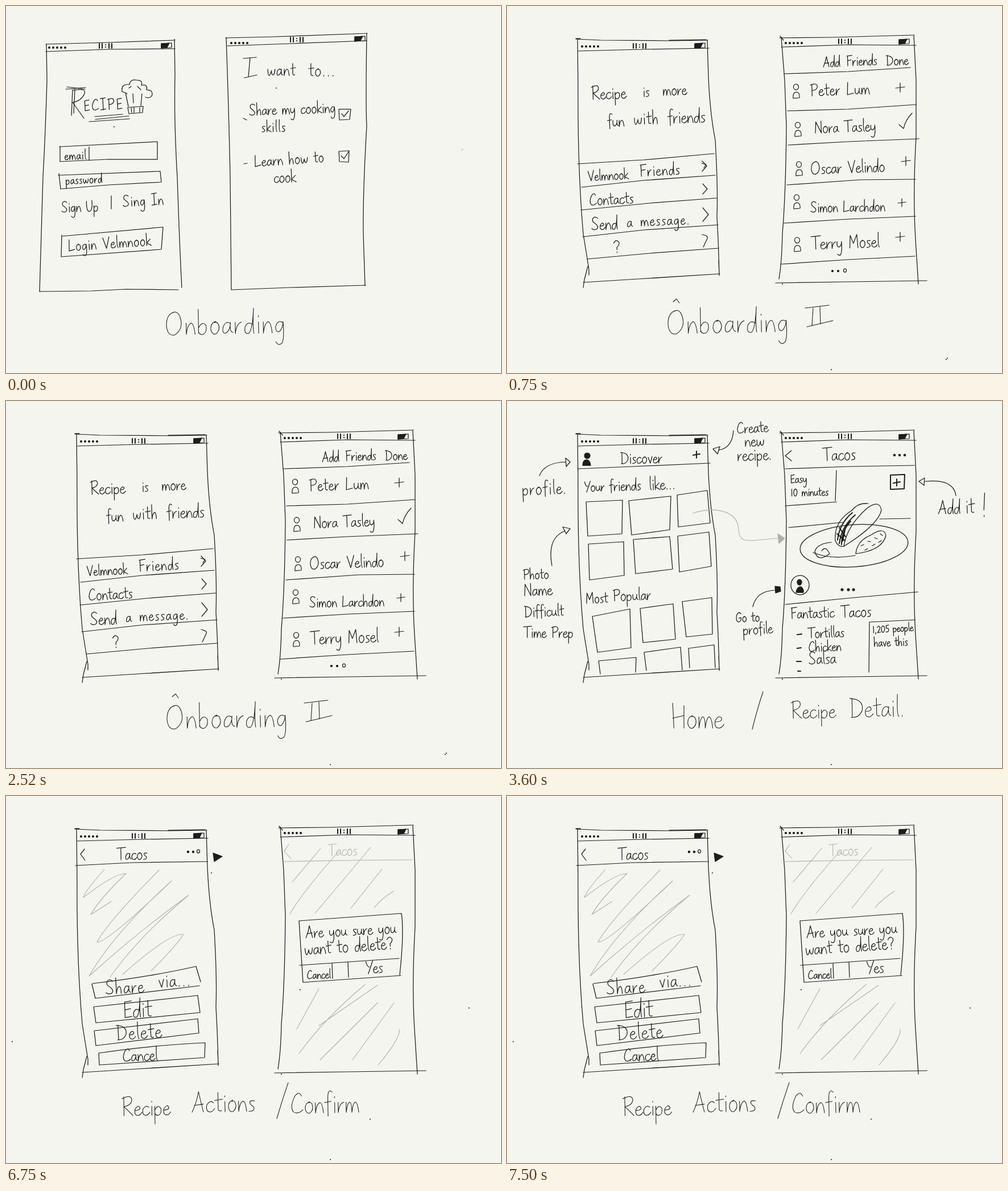
Animation, 870 px wide and 644 px high, one loop 8000 ms. Source, as an HTML page:

```html
<!DOCTYPE html>
<html lang="en">
<head>
<meta charset="utf-8">
<title>App wireframes</title>
<style>
  html, body { margin: 0; width: 100%; height: 100%; overflow: hidden; background: #f5f5f0; }
  svg { display: block; width: 870px; height: 644px; }
  path, ellipse { fill: none; stroke: #1d1d1c; stroke-width: 1.25; stroke-linecap: round; stroke-linejoin: round; vector-effect: non-scaling-stroke; }
  .solid { fill: #1d1d1c; }
  .bold { stroke-width: 2; }
  .thin, .title path { stroke-width: 1.05; }
  .pale, .pale path { stroke: #b0b0ac; stroke-width: 1.1; }
  .pale.solid { fill: #b0b0ac; }
</style>
</head>
<body>
<svg id="stage" viewBox="0 0 870 644"></svg>
<script>
// Single-stroke handwriting: advance width and pen path, baseline at 0, x-height 10.
const GLYPHS = {
  a: [9, 'M7-8Q3-11 1-5Q0 1 4-1Q7-4 7-9Q6-1 9-1'],
  b: [9, 'M1-20L1-1M1-5Q4-11 7-7Q8-2 5 0Q2 1 1-2'],
  c: [8, 'M7-8Q4-11 1-6Q0 0 4 0Q6 0 8-3'],
  d: [9, 'M7-7Q3-10 1-5Q0 1 4 0Q7-3 8-20Q7-5 8 0'],
  e: [8, 'M1-5Q7-5 6-8Q4-11 1-6Q0 0 4 0Q6 0 8-3'],
  f: [7, 'M7-18Q3-22 3-12L3 3M0-9L6-10'],
  g: [9, 'M7-8Q3-11 1-5Q1 0 4-1Q7-4 7-9Q8 4 6 8Q3 11 1 7'],
  h: [9, 'M1-20L1 0Q2-8 5-9Q7-9 7 0'],
  i: [4, 'M2-9L2 0M2-14L2-13'],
  k: [8, 'M1-20L1 0M7-10L1-4L8 0'],
  l: [4, 'M2-20Q1-1 3 0'],
  m: [13, 'M1-9L1 0Q2-8 4-9Q6-9 6 0Q7-8 9-9Q11-9 12 0'],
  n: [9, 'M1-9L1 0Q2-8 5-9Q7-9 8 0'],
  o: [9, 'M5-10Q1-9 1-4Q2 1 5 0Q9-3 7-8Q6-10 4-9'],
  p: [9, 'M1-9L1 9M1-5Q4-11 7-7Q8-2 5 0Q2 1 1-2'],
  r: [7, 'M1-9L1 0Q2-8 6-9'],
  s: [7, 'M6-9Q1-10 2-7Q3-5 5-4Q7 0 1 0'],
  t: [7, 'M3-17L3-2Q4 0 6-1M0-10L7-11'],
  u: [9, 'M1-9Q0 0 4-1Q7-3 7-9Q6-1 9-1'],
  v: [8, 'M1-9L4 0L7-10'],
  w: [12, 'M1-9Q1 0 3 0Q5-2 6-7Q6 0 9-1Q11-4 11-9'],
  y: [9, 'M1-9Q0-1 4-2Q7-4 7-9Q8 4 5 9Q3 10 1 8'],
  A: [13, 'M1 0Q5-8 7-18Q9-8 11 0M3-6L11-7'],
  C: [12, 'M10-15Q8-20 4-15Q-1-5 3-1Q7 1 11-3'],
  D: [13, 'M2-17L2 0M0-17Q13-16 11-6Q8 1 1 0'],
  E: [10, 'M9-17L2-16L2 0L9-1M2-8L8-9'],
  F: [10, 'M2-17L2 0M1-17L10-18M2-9L8-10'],
  G: [12, 'M10-15Q6-21 2-12Q0 0 6 0Q11-2 10-8L6-7'],
  H: [12, 'M1-20L2 0M10-18L10 0M1-8L10-10'],
  I: [9, 'M0-18L8-19M4-18L4 0M0 0L8-1'],
  L: [11, 'M2-18L1 0L10-2'],
  M: [14, 'M1 0L2-17L6-6L11-18L12 0'],
  N: [12, 'M1 0L2-17L10 0L10-18'],
  O: [15, 'M8-18Q1-17 1-7Q2 2 8 0Q15-5 12-14Q10-20 5-17'],
  P: [11, 'M2-17L2 0M0-16Q10-20 10-13Q9-8 2-8'],
  R: [12, 'M2-19L2 0M0-17Q10-22 10-15Q9-10 2-9L11 0'],
  S: [11, 'M9-16Q5-20 2-16Q0-12 5-9Q11-4 7-1Q3 1 0-2'],
  T: [12, 'M0-17L13-18M6-17L6 0'],
  U: [12, 'M1-17Q0 1 6 0Q11-2 10-18'],
  V: [12, 'M1-17L6 0L11-18'],
  Y: [11, 'M1-17Q3-8 6-9M11-18L4 1'],
  0: [10, 'M5-15Q1-14 1-7Q2 1 5 0Q9-4 8-11Q7-16 4-14'],
  1: [5, 'M2-15L2 0'],
  2: [9, 'M1-12Q4-18 7-12Q7-8 1 0L8-1'],
  5: [9, 'M8-16L2-15L2-9Q9-10 7-3Q5 1 1-1'],
  '.': [5, 'M2-1L2 0'],
  ',': [5, 'M2-1L1 3'],
  '?': [10, 'M1-13Q4-19 8-14Q9-11 5-7L5-4M5-1L5 0'],
  '!': [6, 'M3-18L2-5M2-1L2 0'],
  ' ': [8, '']
};

const pen = (d, cls = '') => `<path class="${cls}" d="${d}"/>`;
const oval = (x, y, rx, ry = rx, cls = '', rot = 0) =>
  `<ellipse class="${cls}" cx="${x}" cy="${y}" rx="${rx}" ry="${ry}" transform="rotate(${rot} ${x} ${y})"/>`;
const dots = (y, r, ...xs) => xs.map(x => oval(x, y, r, r, 'solid')).join('');
const speck = (x, y) => oval(x, y, .4, .4, 'solid');
const plus = (x, y, r, cls) => pen(`M${x - r} ${y + 1}L${x + r} ${y - 1}M${x} ${y - r}L${x} ${y + r}`, cls);
const chevron = (x, y, w, h, cls) => pen(`M${x} ${y - h}L${x + w} ${y}L${x} ${y + h}`, cls);

function write(text, x, y, size, tilt = -2, spacing = 0, cls = '') {
  let at = 0;
  const letters = [...text].map(ch => {
    const [advance, d] = GLYPHS[ch];
    const glyph = `<path transform="translate(${at})" d="${d}"/>`;
    at += advance + spacing;
    return glyph;
  }).join('');
  return `<g role="img" aria-label="${text}" class="${cls}" transform="translate(${x} ${y}) rotate(${tilt}) scale(${size})">${letters}</g>`;
}
const title = (text, x, y, size, tilt = -1, spacing = 0) => write(text, x, y, size, tilt, spacing, 'title');
const lines = rows => rows.map(row => write(...row)).join('');

function statusBar(x, y, clockX, clockY, batteryX, batteryY) {
  const clock = [0, 5, 17, 22].map(dx => `M${clockX + dx} ${clockY}l0 8`).join('');
  return dots(y, 1.4, x, x + 7, x + 14, x + 21, x + 28) +
    pen(clock, 'bold') + dots(clockY + 2, .5, clockX + 11) + dots(clockY + 6, .5, clockX + 11) +
    pen(`M${batteryX} ${batteryY + 1}l18-1l0 8l-18 1Z`) +
    pen(`M${batteryX} ${batteryY + 1}l14-1l-4 8l-10 1Z`, 'solid');
}

const leftPhone =
  pen('M121 58L165 60L290 61L353 60M121 57L129 57M285 60L350 59M125 79L240 76L355 74') +
  pen('M124 58Q125 130 125 200Q126 310 134 400L144 462L144 472M142 457L136 480L134 494') +
  pen('M352 60L354 125Q357 190 366 235Q371 320 369 370Q372 420 373 473M372 447L373 468') +
  pen('M134 485L230 479L374 470') +
  statusBar(132, 71, 222, 66, 330, 65);
const rightPhone =
  pen('M479 56L570 55L716 51M480 53L486 60M482 72L600 68L719 69') +
  pen('M482 55L488 130L491 210Q490 330 484 400Q483 450 478 479') +
  pen('M715 52L719 130L719 230Q713 330 718 410L723 488') +
  pen('M472 486L600 484L738 482') + speck(484, 488) +
  statusBar(490, 65, 583, 58, 689, 58);

const person = (x, y) => oval(x, y, 4.5, 5) +
  pen(`M${x - 5} ${y + 20}Q${x - 6} ${y + 9} ${x + 1} ${y + 9}Q${x + 7} ${y + 10} ${x + 6} ${y + 19}Z`);

const onboarding = () =>
  pen('M70 67L180 64L297 60M70 80L180 76L297 75') +
  pen('M71 67L72 130Q69 230 65 300L59 501') +
  pen('M296 58L297 120Q295 200 301 300Q305 420 309 494M59 501L150 500L210 497L303 498') +
  statusBar(76, 73, 164, 66, 273, 65) +
  pen('M105 146L140 143M107 142L139 146M117 147L115 192M121 146L119 188') +
  pen('M118 148Q142 143 138 154Q132 167 117 169L137 197') +
  pen('M156 194L205 190M146 203L217 198M157 199L216 193') +
  pen('M204 150Q202 136 217 138Q218 128 230 130Q241 130 238 139Q250 137 247 147Q258 147 257 156Q254 163 245 160') +
  pen('M210 152L215 176M223 154L224 170M239 154L237 175M204 150L213 154M216 144L220 141M231 141L237 147') +
  pen('M214 178L241 176L240 187L216 189ZM220 179L221 187M225 178L225 187M235 178L235 186') +
  pen('M95 246L95 273L180 269L266 269L266 238L94 247M146 247L146 271') +
  pen('M93 294L96 321L180 314L273 309L271 290L92 297') +
  pen('M98 402L97 440L273 427L276 388L98 404M185 333L185 356') +
  lines([
    ['ECIPE', 137, 184, 1.1, -3, 2.5], ['email', 103, 270, .9, -2, 1.2], ['password', 105, 313, .85, -3, 1],
    ['Sign Up', 98, 362, 1.05], ['Sing In', 206, 352, 1.1, -3, 1], ['Login Velmnook', 110, 430, 1.1, -4, .8],
    ['want', 459, 122, 1.25, 0, 1], ['to...', 532, 123, 1.3, 0, 1.2],
    ['Share my cooking', 428, 192, 1.1], ['skills', 449, 221, 1.05, -1, 1.3],
    ['Learn how to', 437, 282, 1.1, -4, .5], ['cook', 471, 310, 1.15]
  ]) +
  pen('M386 56L470 54L635 48M389 70L500 66L634 61') +
  pen('M387 55Q392 200 394 300L396 498L500 494L632 490') +
  pen('M634 48Q632 180 634 210Q627 330 628 400L631 491') +
  statusBar(396, 65, 500, 55, 613, 53) +
  pen('M417 92L440 90M429 91L426 124M419 126L441 121') +
  pen('M585 181L606 181L604 199L586 200ZM590 189L594 194L602 184') +
  pen('M585 255L603 254L602 274L586 273ZM589 263L594 268L602 256') +
  pen('M417 197L423 200M418 277L424 276') + speck(190, 212) + speck(475, 144) +
  pen('M801 253L803 251', 'pale') +
  title('Onboarding', 280, 577, 2.2, -1, .8);

const inviteFriends = () => leftPhone + rightPhone +
  pen('M124 277L240 270L364 259M131 318L240 306L366 297M130 358L250 346L369 337M133 405L240 393L371 384M141 444L250 434L372 425') +
  chevron(343, 281, 8, 9) + pen('M342 276L350 278L346 284') +
  chevron(344, 321, 8, 9) + chevron(344, 366, 10, 12) + pen('M343 401Q354 403 352 408L345 423') +
  pen('M487 119L600 115L709 108M493 184L600 181L719 173M494 244L600 238L724 233') +
  pen('M492 314L620 305L718 304M487 381L600 374L718 369M482 453L600 445L717 439') +
  person(508, 142) + person(511, 209) + person(513, 278) + person(509, 336) + person(510, 411) +
  plus(691, 143, 8) + plus(701, 272, 8) + plus(694, 345, 7) + plus(691, 405, 8) +
  pen('M689 208L697 215Q700 200 712 188') +
  lines([
    ['Recipe', 149, 164, 1.25], ['is', 239, 159, 1.1], ['more', 274, 157, 1.15],
    ['fun', 177, 212, 1.2], ['with', 223, 208, 1.25, -2, 1], ['friends', 283, 206, 1.3],
    ['Velmnook', 142, 307, 1, -3], ['Friends', 234, 299, 1.15, -3, 1.2], ['Contacts', 145, 350, 1.15, -3],
    ['Send', 149, 393, 1.25], ['a', 211, 388, 1.1], ['message.', 235, 386, 1.1, -2, 1.8], ['?', 187, 433, 1.3],
    ['Add', 555, 107, 1], ['Friends', 597, 105, 1], ['Done', 667, 104, 1],
    ['Peter Lum', 534, 158, 1.2, -2, .6], ['Nora Tasley', 541, 223, 1.15],
    ['Oscar Velindo', 534, 295, 1.2], ['Simon Larchdon', 534, 362, 1.05, -1], ['Terry Mosel', 535, 427, 1.3]
  ]) +
  dots(465, 1.5, 572, 582) + oval(594, 464, 2.5, 3) +
  title('Onboarding', 281, 575, 2.25, -1, .7) +
  pen('M292 519L298 514L303 521M524 530L566 525M538 530L536 561M550 528L551 558M527 563L573 552', 'thin') +
  speck(772, 620) + speck(774, 618) + speck(570, 638);

const taco = () =>
  oval(610, 254, 95, 37, '', -4) + pen('M495 222L590 213M655 207L709 206') +
  pen('M592 255Q597 220 633 188Q655 172 658 192Q652 215 606 246Z') +
  pen('M577 245Q574 212 606 192Q617 178 635 180M577 245Q582 257 592 255') +
  pen('M581 244Q584 215 607 196M584 250Q588 220 612 200M588 252Q588 228 604 211M580 233L594 245M584 222L595 238M590 246L594 226', 'bold') +
  pen('M570 248Q545 250 541 264Q546 284 567 268Q560 253 553 263M538 266Q570 279 612 271') +
  pen('M613 268Q615 245 640 235Q663 220 666 236Q660 262 613 268M622 254L627 252M629 262L634 259M634 246L639 247M642 254L647 251M646 240L651 242M653 248L658 245M656 233L660 236');

const home = () => leftPhone + rightPhone +
  pen('M124 119L220 115L357 109') + oval(141, 96, 5, 5, 'solid') +
  pen('M133 113Q133 103 140 103Q146 104 147 113Z', 'solid') + plus(333, 94, 6, 'bold') +
  pen('M139 177L203 174L202 233L142 237ZM214 175L288 167L286 226L219 235ZM299 165L352 157L357 214L301 221Z') +
  pen('M143 251L205 247L206 306L145 314ZM222 243L286 238L291 295L226 303ZM300 237L355 230L359 290L303 300Z') +
  pen('M150 378L216 365L218 433L159 441ZM234 364L292 356L296 418L239 424ZM308 352L360 345L361 409L315 414Z') +
  pen('M164 479L161 456L227 450L226 476M245 473L241 441L305 432L308 472M321 468L319 434L364 428L366 468') +
  pen('M398 52Q396 82 373 86M362 84L374 80L370 93Z') +
  pen('M57 131Q66 108 103 107M103 100L111 107L104 115Z') +
  pen('M79 289Q70 240 102 228M98 221L111 224L104 233Z') +
  pen('M327 197C360 185 405 190 407 225C408 255 430 243 478 241', 'pale') +
  pen('M476 233L488 241L478 250Z', 'pale solid') +
  pen('M489 119L600 115L716 113M500 87L489 96L500 105') + dots(95, 1.7, 681, 690, 699) +
  pen('M579 122L577 175M489 184L579 177') +
  pen('M674 130L699 129L698 154L674 155Z', 'bold') + plus(685, 143, 6, 'bold') +
  pen('M789 166Q785 136 735 141M724 141L734 135L733 148Z') +
  taco() +
  oval(515, 323, 16, 17) + oval(514, 318, 4, 5, 'solid') +
  pen('M508 336Q510 325 517 326Q522 330 521 336Z', 'solid') + dots(331, 2, 589, 600, 609) +
  pen('M489 357L600 346L722 335M636 476L637 388L717 384') +
  pen('M510 410L518 409M510 434L517 433M509 457L517 457M511 474L516 474', 'bold') +
  pen('M432 361Q438 334 470 332') + pen('M471 325L480 326L481 334L472 337Z', 'solid') +
  lines([
    ['Discover', 200, 110, 1.15, -1], ['Your', 136, 159, 1], ['friends', 180, 158, 1.1], ['like...', 250, 156, 1.2],
    ['Most', 139, 355, 1.05], ['Popular', 187, 351, 1.15],
    ['Create', 404, 57, 1.1, -3], ['new', 418, 80, 1.2], ['recipe.', 405, 105, 1.25], ['profile.', 27, 165, 1.3, -2, 1],
    ['Photo', 29, 313, 1], ['Name', 30, 342, 1.2], ['Difficult', 31, 379, 1.1], ['Time Prep', 29, 415, 1.1, 0],
    ['Tacos', 555, 105, 1.3], ['Easy', 498, 144, .85], ['10 minutes', 499, 167, .83, -1],
    ['Add', 757, 198, 1.3, -1], ['it', 806, 197, 1.5], ['!', 834, 203, 2.3],
    ['Go to', 402, 388, .95], ['profile', 415, 410, 1.1, -3]
  ]) +
  lines([
    ['Fantastic', 499, 382, 1.1], ['Tacos', 587, 380, 1.2], ['Tortillas', 529, 416, 1.02], ['Chicken', 530, 440, 1],
    ['Salsa', 531, 462, 1.2], ['1,205 people', 643, 407, .77, -3], ['have this', 645, 431, .87]
  ]) +
  title('Home', 289, 574, 2.2, 0) + pen('M450 510Q440 540 431 576', 'thin') +
  title('Recipe', 500, 557, 1.6) + title('Detail.', 603, 555, 1.95) + speck(570, 638);

const recipeActions = () => leftPhone + rightPhone +
  pen('M122 122L220 117L354 115M138 93L131 102L139 113') + dots(98, 1.6, 320, 329) + oval(338, 97, 2.5, 3) +
  pen('M364 100L380 106L366 115Z', 'solid') + speck(361, 135) +
  pen('M173 129Q140 165 136 178Q190 136 211 136Q165 180 149 208L185 185', 'pale') +
  pen('M269 130Q180 220 160 256Q175 260 291 149Q190 240 146 316Q230 240 321 174Q230 250 183 318', 'pale') +
  pen('M205 313Q290 238 312 243Q300 262 255 307', 'pale') +
  pen('M151 330L157 355L340 333M152 329Q250 318 334 299L342 326') +
  pen('M154 370L158 398L341 380L337 350ZM155 412L158 438L339 416L337 391Z') +
  pen('M163 451L164 472L349 459L350 433Q250 438 164 451') +
  pen('M497 85L489 97L501 110M489 115L600 113L714 112', 'pale') +
  pen('M553 92L503 151M585 97Q520 170 499 207M641 90L543 206M661 128L606 197M681 167Q660 180 647 196', 'pale') +
  pen('M550 338L511 409M631 331Q560 390 515 452M653 332L550 403M653 363L552 463M682 363L609 463M691 409Q694 425 654 472', 'pale') +
  pen('M515 219L522 327L694 315M516 219L695 206Q700 240 692 314M516 297L691 285M573 294L574 320M601 292L602 318') +
  lines([
    ['Tacos', 195, 112, 1.2, -1], ['Share', 176, 348, 1.4, -3, 1], ['via...', 268, 336, 1.4, -3, 1],
    ['Edit', 206, 389, 1.7], ['Delete', 195, 428, 1.5, -3, 1], ['Cancel', 205, 466, 1.25],
    ['Tacos', 566, 105, 1.15, -1, 0, 'pale'],
    ['Are you sure you', 526, 249, 1.17, -3], ['want to delete?', 525, 279, 1.28, -4],
    ['Cancel', 529, 321, .85], ['Yes', 632, 311, 1.2]
  ]) +
  title('Recipe', 204, 561, 1.75) + title('Actions', 325, 555, 2) +
  pen('M496 503Q485 535 476 566', 'thin') + title('Confirm', 500, 557, 2) +
  speck(640, 567) + speck(517, 340) + speck(11, 431) + speck(814, 372) + speck(570, 638);

const SCENES = [[0, onboarding], [750, inviteFriends], [3600, home], [6750, recipeActions]];
const LOOP = 8000;
const stage = document.getElementById('stage');
stage.innerHTML = SCENES.map(([, draw]) => `<g>${draw()}</g>`).join('');
const layers = [...stage.children];
const start = performance.now();

function render() {
  const time = Math.max(0, performance.now() - start) % LOOP;
  const current = SCENES.findLastIndex(([from]) => time >= from);
  layers.forEach((layer, i) => layer.style.display = i === current ? '' : 'none');
  requestAnimationFrame(render);
}
render();
</script>
</body>
</html>
```
